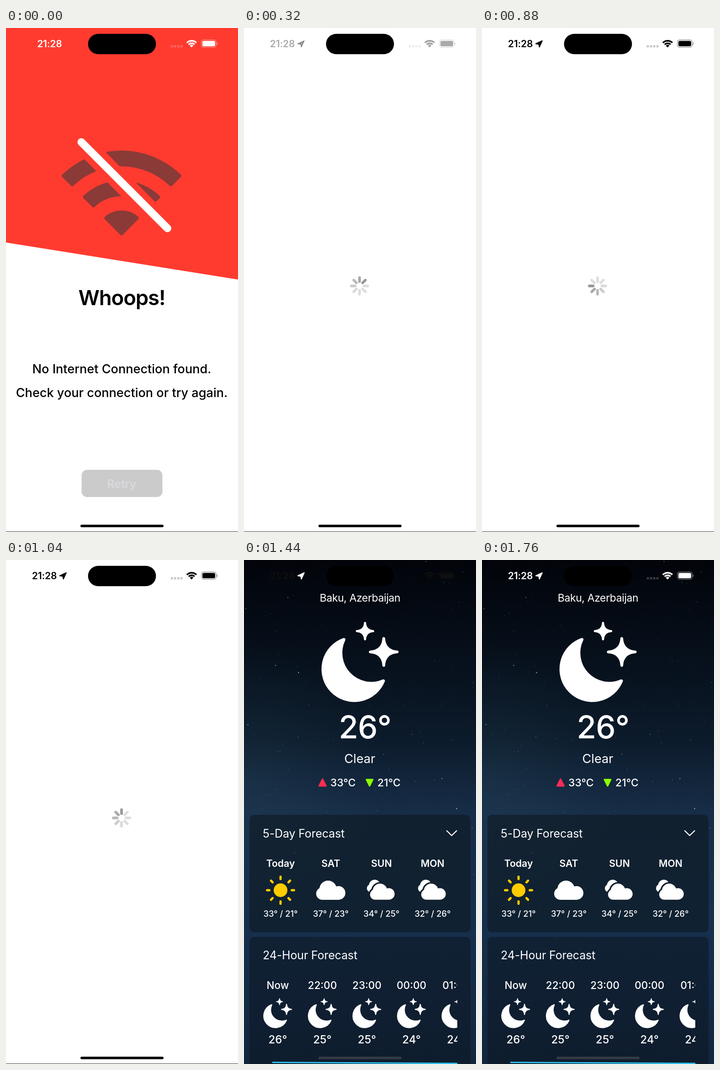
Animation of 508x1102 px, one loop 3920 ms. Source, as an HTML page with a canvas:

```html
<!DOCTYPE html>
<html lang="en">
<head>
<meta charset="utf-8">
<title>Weather launch</title>
<style>
html, body { margin: 0; width: 100%; height: 100%; overflow: hidden; background: #fff; }
canvas { display: block; }
</style>
</head>
<body>
<canvas id="stage" width="508" height="1102"></canvas>
<script>
const W = 508, H = 1102, LOOP = 3920, STEP = 80;
const LOADING_AT = 80, WEATHER_AT = 1440;
const CARD = '#122131';
const ctx = document.getElementById('stage').getContext('2d');
const clamp = v => Math.max(0, Math.min(1, v));

function text(str, x, y, size, weight = 400, color = '#fff', align = 'center', spacing = 0) {
  ctx.font = `${weight} ${size}px Inter, sans-serif`;
  ctx.letterSpacing = `${spacing * size}px`;
  ctx.textAlign = align;
  ctx.fillStyle = color;
  ctx.fillText(str, x, y);
}

function box(x, y, w, h, r, color) {
  ctx.fillStyle = color;
  ctx.beginPath();
  ctx.roundRect(x, y, w, h, r);
  ctx.fill();
}

function line(points, width, color) {
  ctx.beginPath();
  points.forEach(([x, y]) => ctx.lineTo(x, y));
  ctx.lineWidth = width;
  ctx.strokeStyle = color;
  ctx.lineCap = ctx.lineJoin = 'round';
  ctx.stroke();
}

// Fills a shape and rounds its corners with an outline of the same colour.
function blob(path, width, color) {
  ctx.fillStyle = ctx.strokeStyle = color;
  ctx.lineWidth = width;
  ctx.lineJoin = 'round';
  ctx.fill(path);
  ctx.stroke(path);
}

function at(x, y, scale, draw) {
  ctx.save();
  ctx.translate(x, y);
  ctx.scale(scale, scale);
  draw();
  ctx.restore();
}

// Wi-Fi bands, apex at the origin.
function wifi(bands, corner, color) {
  const mid = -Math.PI / 2, half = 0.79;
  for (const [inner, outer] of bands) {
    const path = new Path2D();
    const trim = corner / 2;
    const spread = r => half - trim / r;
    const r1 = outer - trim, r0 = inner + trim;
    path.arc(0, 0, r1, mid - spread(r1), mid + spread(r1));
    if (inner) path.arc(0, 0, r0, mid + spread(r0), mid - spread(r0), true);
    else path.lineTo(0, -trim * 1.3);
    path.closePath();
    blob(path, corner, color);
  }
}

function star(x, y, r) {
  const path = new Path2D(), k = r * 0.06;
  path.moveTo(x, y - r);
  path.quadraticCurveTo(x + k, y - k, x + r, y);
  path.quadraticCurveTo(x + k, y + k, x, y + r);
  path.quadraticCurveTo(x - k, y + k, x - r, y);
  path.quadraticCurveTo(x - k, y - k, x, y - r);
  path.closePath();
  return path;
}

const moon = new Path2D('M218.5 174 A68.5 68.5 0 1 0 305 264.5 A66.8 66.8 0 0 1 218.5 174Z');
const sparkles = [star(265, 155.5, 18), star(306, 201, 29.5)];

function moonIcon(x, y, scale) {
  at(x, y, scale, () => {
    blob(moon, 7, '#fff');
    sparkles.forEach((s, i) => blob(s, 4.5 + i * 1.5, '#fff'));
  });
}

const cloudPath = new Path2D();
for (const [x, y, r] of [[26, 19, 19], [13.5, 28.5, 13.5], [49, 27, 15]]) {
  cloudPath.moveTo(x + r, y);
  cloudPath.arc(x, y, r, 0, 7);
}
cloudPath.rect(13.5, 20, 35.5, 22);

function cloud(x, y, scale, gap = 0) {
  at(x, y, scale, () => {
    if (gap) blob(cloudPath, gap, CARD);
    ctx.fillStyle = '#fff';
    ctx.fill(cloudPath);
  });
}

function clouds(x) {
  cloud(x - 32, 699, 0.66);
  cloud(x - 25, 707.5, 0.84, 8);
}

function sun(x, y) {
  ctx.fillStyle = '#ffcc00';
  ctx.beginPath();
  ctx.arc(x, y, 15, 0, 7);
  ctx.fill();
  for (let i = 0; i < 8; i++) {
    const c = Math.cos(i * Math.PI / 4), s = Math.sin(i * Math.PI / 4);
    line([[x + 24.5 * c, y + 24.5 * s], [x + 29.5 * c, y + 29.5 * s]], 5, '#ffcc00');
  }
}

function statusBar(color, alpha, timeX, arrowColor) {
  ctx.globalAlpha = alpha;
  text('21:28', timeX, 42, 21, 600, color, 'center', -0.008);
  at(406.5, 42.5, 1, () => wifi([[0, 5.6], [7.2, 10.9], [12.8, 16.5]], 0.8, color));
  box(430, 28.3, 28, 11.6, 3.2, color);
  ctx.globalAlpha = alpha * 0.4;
  ctx.strokeStyle = color;
  ctx.lineWidth = 1.4;
  ctx.beginPath();
  ctx.roundRect(427.7, 26, 32.6, 16.2, 5);
  ctx.stroke();
  box(461.5, 31.5, 2, 5.5, [0, 2, 2, 0], color);
  ctx.globalAlpha = alpha * 0.22;
  for (let i = 0; i < 4; i++) box(360.8 + i * 7, 37.6, 4.8, 4.8, 1.2, color);
  ctx.globalAlpha = alpha;
  if (arrowColor) blob(new Path2D('M131.8 28 L125.6 41.6 L124.4 35.4 L117.8 34.4Z'), 2, arrowColor);
  ctx.globalAlpha = 1;
}

function island() {
  box(179.6, 12.8, 148.8, 44.4, 22.2, '#000');
}

function lightChrome() {
  island();
  box(163, 1086, 182, 5.6, 2.8, '#000');
  ctx.fillStyle = '#333';
  ctx.fillRect(0, 1101, W, 1);
}

function offline() {
  const red = '#ff3b30';
  ctx.fillStyle = red;
  ctx.fill(new Path2D('M0 0H508V550L0 469Z'));
  at(253, 454.5, 1, () => wifi([[0, 55.5], [86.5, 121], [152, 186.5]], 8, '#8a3a37'));
  line([[150, 234], [368, 453]], 44, red);
  line([[165, 249.5], [353.5, 438]], 17, '#fff');
  text('Whoops!', 253.5, 606, 45.5, 600, '#000', 'center', -0.024);
  text('No Internet Connection found.', 253.5, 755, 27.1, 500, '#000');
  text('Check your connection or try again.', 253.5, 807, 27.1, 500, '#000');
  box(165.5, 966, 177, 59.5, 12, '#cbcbcb');
  text('Retry', 253.5, 1006, 25, 600, '#d9d9dd');
  statusBar('#fff', 1, 95.3);
  lightChrome();
}

function loading(t) {
  const shades = [0x98, 0xa8, 0xb9, 0xcc, 0xda, 0xde, 0xde, 0xde];
  const head = Math.floor((t + 600) / 100);
  for (let i = 0; i < 8; i++) {
    const a = i * Math.PI / 4, s = Math.sin(a), c = -Math.cos(a);
    const v = shades[((head - i) % 8 + 8) % 8];
    line([[253 + 9.6 * s, 564 + 9.6 * c], [253 + 18 * s, 564 + 18 * c]], 5.8, `rgb(${v},${v},${v + 2})`);
  }
  statusBar('#000', clamp((t - 160) / 480), 84, '#000');
  lightChrome();
}

let seed = 11;
const random = () => (seed = seed * 16807 % 2147483647) / 2147483647;
const sky = Array.from({ length: 420 }, () => ({
  x: random() * W, y: random() * H, size: 0.45 + random() ** 4 * 0.8, glow: 0.15 + random() ** 2 * 0.6
}));
const night = ctx.createLinearGradient(0, 0, 0, H);
[[0, '#02040a'], [0.18, '#060f1a'], [0.36, '#0c1b2b'], [0.5, '#172d47'], [0.74, '#162f4c'], [1, '#11263e']]
  .forEach(([p, c]) => night.addColorStop(p, c));
const haze = ctx.createRadialGradient(0, 480, 0, 0, 480, 300);
haze.addColorStop(0, 'rgba(50,90,110,0.2)');
haze.addColorStop(1, 'rgba(50,90,110,0)');

function background() {
  for (const fill of [night, haze]) {
    ctx.fillStyle = fill;
    ctx.fillRect(0, 0, W, H);
  }
  for (const s of sky) {
    ctx.fillStyle = `rgba(205,222,240,${s.glow * (s.y > 560 ? 0.6 : 1)})`;
    ctx.beginPath();
    ctx.arc(s.x, s.y, s.size, 0, 7);
    ctx.fill();
  }
  box(12, 557, 484, 257, 10, 'rgba(13,21,28,0.53)');
  box(12, 824, 484, 300, 10, 'rgba(12,20,30,0.5)');
}

function weather(t) {
  background();
  text('Baku, Azerbaijan', 254, 91, 23, 400, '#fff', 'center', -0.017);
  moonIcon(0, 0, 1);
  text('26°', 265, 389.5, 69, 500, '#fff', 'center', -0.012);
  text('Clear', 253.5, 443.5, 27.2, 400);
  blob(new Path2D('M172 479L179.5 494H164.5Z'), 3, '#ff2d55');
  blob(new Path2D('M275 494L282 480H268Z'), 3, '#8cff00');
  text('33°C', 189, 495, 23, 500, '#fff', 'left');
  text('21°C', 292, 495, 23, 500, '#fff', 'left');

  text('5-Day Forecast', 41, 607, 25, 400, '#fff', 'left', -0.006);
  line([[444, 592], [454.7, 602.5], [465.5, 592]], 2.4, '#fff');
  [['Today', '33° / 21°', 80], ['SAT', '37° / 23°', 190], ['SUN', '34° / 25°', 301], ['MON', '32° / 26°', 413]]
    .forEach(([day, range, x]) => {
      text(day, x, 670.5, 21.2, 600);
      text(range, x, 780, 18.4, 500);
    });
  sun(80, 722);
  cloud(158, 701, 1);
  clouds(301);
  clouds(413);

  text('24-Hour Forecast', 41, 873, 25, 400, '#fff', 'left', -0.006);
  ctx.save();
  ctx.beginPath();
  ctx.rect(42, 900, 425, 180);
  ctx.clip();
  [['Now', 26], ['22:00', 25], ['23:00', 25], ['00:00', 24], ['01:00', 24]].forEach(([hour, temp], i) => {
    const x = 74 + i * 97.6;
    text(hour, x, 938, 22.5, 500);
    moonIcon(x - 95, 907.7, 0.373);
    text(temp + '°', x, 1057, 24, 500);
  });
  ctx.restore();

  line([[63, 1098.5], [466, 1100.7]], 3, '#2fc0ec');
  box(163, 1086, 182, 5.6, 2.8, '#353b43');
  island();
  const v = Math.round(255 * (0.06 + 0.94 * clamp((t - WEATHER_AT) / 320)));
  statusBar(`rgb(${v},${v},${v})`, 1, 84, '#fff');
}

function frame(now) {
  const t = Math.floor(now % LOOP / STEP) * STEP;
  ctx.fillStyle = '#fff';
  ctx.fillRect(0, 0, W, H);
  if (t < LOADING_AT) offline();
  else if (t < WEATHER_AT) loading(t);
  else weather(t);
  requestAnimationFrame(frame);
}
frame(performance.now());
</script>
</body>
</html>
```
